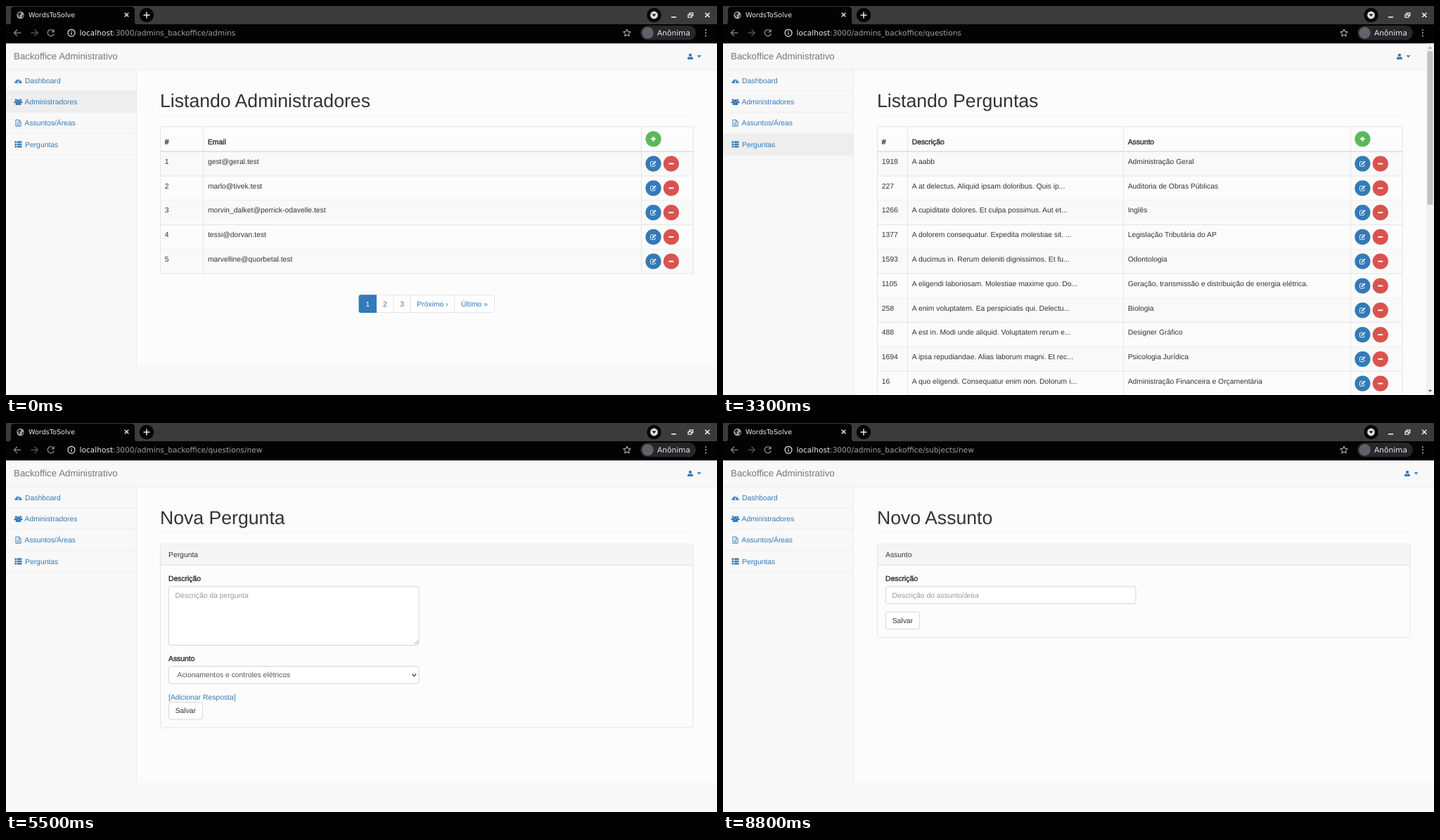
These frames come from a looping animation (1011x554 px, 9.9 s). An HTML page:

```html
<!DOCTYPE html>
<html lang="pt-BR">
<head>
<meta charset="utf-8">
<title>Backoffice</title>
<style>
html, body { margin: 0; width: 100%; height: 100%; overflow: hidden; background: #f8f8f8; }
#strip { width: 1011px; animation: pages 9.9s steps(9) infinite; }
@keyframes pages { to { transform: translateY(-100%); } }
svg { display: block; width: 1011px; height: 554px; }
text { font: 10.36px "Liberation Sans", Arial, sans-serif; fill: #333; text-rendering: geometricPrecision; white-space: pre; }
.h1 { font-size: 26.64px; }
.brand { font-size: 13.32px; fill: #777; }
.bold { stroke: #333; stroke-width: .42px; }
.link { fill: #337ab7; }
.val { fill: #555; }
.hint { fill: #999; }
.on { fill: #fff; }
.mid { text-anchor: middle; }
.ui { font: 10.6px "DejaVu Sans", sans-serif; fill: #e8eaed; }
.ui .path { fill: #9aa0a6; }
.tab { font-size: 9.65px; }
.line { fill: none; stroke: #e8eaed; stroke-width: 1.2; }
</style>
</head>
<body>
<div id="strip"></div>
<script>
const BLUE = '#337ab7', GREEN = '#5cb85c', RED = '#d9534f';
const ROW = 34.78, FIELD = 54.7;

const rect = (x, y, w, h, fill, more = '') =>
  `<rect x="${x}" y="${y}" width="${w}" height="${h}" fill="${fill}" ${more}/>`;
const box = (x, y, w, h, fill, stroke = '#ccc', r = 3) =>
  rect(x, y, w, h, fill, `rx="${r}" stroke="${stroke}" stroke-width=".8"`);
const text = (x, y, s, cls = '') => `<text x="${x}" y="${y}" class="${cls}">${s}</text>`;
const path = (d, stroke, w = 1, more = '') =>
  `<path d="${d}" fill="none" stroke="${stroke}" stroke-width="${w}" ${more}/>`;
const solid = (d, fill) => `<path d="${d}" fill="${fill}"/>`;
const dot = (x, y, r, fill) => `<circle cx="${x}" cy="${y}" r="${r}" fill="${fill}"/>`;
const at = (x, y, s) => `<g transform="translate(${x} ${y})">${s}</g>`;
const hline = (x1, x2, y, c = '#ddd', w = .75) => path(`M${x1} ${y}H${x2}`, c, w);

const person = (x, y, k) => at(x, y, `<g transform="scale(${k})">` + dot(0, -2.1, 2.2, BLUE) +
  solid('M-4 4.2V2.6Q-4 .3-2 .2Q0 1.7 2 .2Q4 .3 4 2.6V4.2Z', BLUE) + '</g>');

const icons = [
  solid('M-5.2 3.8A5.2 5.2 0 1 1 5.2 3.8Z', BLUE) + dot(-3.4, .8, .7, '#f8f8f8') +
    dot(-2.3, -1.8, .7, '#f8f8f8') + dot(0, -2.8, .7, '#f8f8f8') + dot(3.4, .8, .7, '#f8f8f8') +
    path('M0 2.2 1.4-1.4', '#f8f8f8', .9) + dot(0, 2.3, 1.1, '#f8f8f8'),
  person(-3.3, -1, .7) + person(3.3, -1, .7) + person(0, .7, .95),
  path('M-3.6-4.6H1L3.6-2V4.6H-3.6ZM.8-4.6V-1.8H3.6', BLUE, .9) +
    path('M-2 0H2M-2 1.5H2M-2 3H2', BLUE, .7),
  [-3.3, 0, 3.3].map(y => rect(-5, y - 1.2, 2.5, 2.4, BLUE) + rect(-1.8, y - 1.2, 6.8, 2.4, BLUE)).join('')
];

const round = (x, y, fill, icon) => at(x, y, dot(0, 0, 11.1, fill) + icon);
const plus = path('M-3.4 0H3.4M0-3.4V3.4', '#fff', 1.9);
const minus = path('M-3.4 0H3.4', '#fff', 2);
const pencil = path('M2.5 .9V2.6Q2.5 3.7 1.4 3.7H-2.8Q-3.9 3.7-3.9 2.6V-1.8Q-3.9-2.9-2.8-2.9H.6', '#fff', .9) +
  path('M-1.4 1.4 3.5-3.3', '#fff', 1.7);

function browser(url) {
  return rect(0, 0, 1011, 26.5, '#3b3b3b') + rect(0, 26, 1011, 27.3, '#030303') +
    solid('M3 26.5Q7 26.5 7 22.5V6Q7 1 12 1H178Q183 1 183 6V22.5Q183 26.5 187 26.5Z', '#030303') +
    dot(20.5, 13, 5.2, '#a4a8ac') +
    solid('M16.5 11.5Q18 8.5 20.5 9L22 11 19.5 13 20 15.5 18.5 16ZM22.5 13.5 25 12.5Q25 15.5 22.5 17Z', '#222') +
    text(32, 16.3, 'WordsToSolve', 'ui tab') +
    path('M168.7 9.7l5.6 5.6m0-5.6l-5.6 5.6', '#e8eaed', 1.4) +
    dot(200, 13, 10.2, '#030303') + path('M195.5 13h9M200 8.5v9', '#e8eaed', 1.5) +
    dot(921.5, 13, 10.2, '#030303') + dot(921.5, 13, 5.4, '#dcdcdc') +
    solid('M918.6 11.6h5.8l-2.9 3.4Z', '#111') +
    path('M946 15.8h7', '#eee', 1.6) +
    path('M970 12.5h4.8v3.6H970ZM972 12v-2.2h4.8v4H975', '#eee', 1.3) +
    path('M994.2 9.7l6.2 6.2m0-6.2l-6.2 6.2', '#eee', 1.5) +
    path('M21.3 38.3H11.5M16 33.7l-4.6 4.6 4.6 4.6', '#85888c', 1.3) +
    path('M35.3 38.3h9.8M40.6 33.7l4.6 4.6-4.6 4.6', '#55585c', 1.3) +
    path('M67.4 35.2A4.6 4.6 0 1 0 68.3 39.5', '#85888c', 1.4) + solid('M68.7 33v4.6h-4.6Z', '#85888c') +
    '<circle class="line" cx="93" cy="38.3" r="5"/>' + path('M93 37.5v3.4M93 35.2v1.3', '#e8eaed', 1.2) +
    text(104.5, 42, `localhost<tspan class="path">:3000/admins_backoffice/${url}</tspan>`, 'ui') +
    path('M883 33.2l1.5 3.4 3.7.3-2.8 2.5.8 3.6-3.2-1.9-3.2 1.9.8-3.6-2.8-2.5 3.7-.3Z', '#d0d2d5', 1) +
    rect(902, 28, 79, 20.6, '#25272a', 'rx="10.3"') + dot(912.5, 38.3, 8.3, '#5f6368') +
    text(926, 42, 'Anônima', 'ui') +
    [34.2, 38.3, 42.4].map(y => dot(995, y, 1, '#b5b8bc')).join('');
}

const menu = ['Dashboard', 'Administradores', 'Assuntos/Áreas', 'Perguntas'];

function frame(active, right) {
  return rect(0, 53.3, 1011, 501, '#f8f8f8') +
    rect(185.5, 91, right + 34 - 185.5, right < 970 ? 463 : 421, '#fcfcfc') +
    path(`M185.5 91V${right < 970 ? 554 : 512}`, '#e7e7e7', .8) +
    hline(0, right + 34, 90.8, '#e7e7e7') +
    text(11, 76.4, 'Backoffice Administrativo', 'brand') +
    person(right - 4.5, 72, .98) + solid(`M${right + 5} 70.3h6.2l-3.1 3.2Z`, BLUE) +
    menu.map((name, i) => {
      const y = 105.7 + 30.35 * i;
      return (i === active ? rect(0, y - 15, 185, 30.3, '#eeeeee') : '') +
        hline(0, 185, y + 15.2, '#e7e7e7') + at(17.5, y + .3, icons[i]) +
        text(i % 3 ? 26.5 : 27, y + 3.8, name, 'link');
    }).join('');
}

function scrollbar(end) {
  return rect(1000, 53.3, 11, 501, '#f1f1f1') + rect(1001.5, 64.5, 8, end - 64.5, '#c1c1c1') +
    solid('M1002.8 60.8h5.4l-2.7-3Z', '#a3a3a3') + solid('M1002.8 546.8h5.4l-2.7 3Z', '#505050');
}

function page({ url, title, body, active = -1, scroll = 0 }) {
  const right = scroll ? 966.4 : 977.5;
  return '<svg viewBox="0 0 1011 554">' + frame(active, right) + browser(url) +
    text(219, 144.2, title, 'h1') + hline(219, right, 156, '#eee') +
    body(right) + (scroll ? scrollbar(scroll) : '') + '</svg>';
}

// cols: left edge of each text column; the action column is always last
const table = (cols, heads, rows) => right => {
  const top = 171.8, first = 207.3, bottom = first + ROW * rows.length;
  const act = right - 74, edges = [...cols, act, right - .3];
  const cells = (list, y, cls) => list.map((s, i) => text(cols[i] + 6.3, y, s, cls)).join('');
  return rows.map((r, i) => {
    const y = first + ROW * i;
    return (i % 2 ? '' : rect(cols[0], y, right - cols[0], ROW, '#f9f9f9')) +
      hline(cols[0], right, y + ROW) + cells(r, y + 17.6) +
      round(act + 17, y + 17.3, BLUE, pencil) + round(act + 42.4, y + 17.3, RED, minus);
  }).join('') + cells(heads, 196.7, 'bold') + round(act + 17, 189.3, GREEN, plus) +
    hline(cols[0], right, top) + hline(cols[0], right, first, '#ddd', 1.5) +
    edges.map(x => path(`M${x} ${top}V${bottom}`, '#ddd', .75)).join('');
};

function pager() {
  const xs = [502, 527, 551, 575.5, 637.5, 694.5];
  const names = ['1', '2', '3', 'Próximo ›', 'Último »'];
  return box(502, 411.7, 192.5, 24.8, '#fff', '#ddd') +
    solid('M527 411.3V436.9H504.6Q501.6 436.9 501.6 433.9V414.3Q501.6 411.3 504.6 411.3Z', BLUE) +
    xs.slice(2, 5).map(x => path(`M${x} 411.7V436.5`, '#ddd', .75)).join('') +
    names.map((s, i) => text((xs[i] + xs[i + 1]) / 2, 427.7, s, 'mid ' + (i ? 'link' : 'on'))).join('');
}

const button = y => box(231.4, y, 48, 24.5, '#fff') + text(255.4, y + 15.9, 'Salvar', 'mid');
const label = (y, s) => text(231, y, s, 'bold');

function panel(name, bottom, right) {
  const w = right - 219.8;
  return box(219.5, 172, w, bottom - 172, '#fcfcfc', '#ddd') +
    rect(219.9, 172.4, w - .8, 30, '#f5f5f5', 'rx="2.5"') + hline(219.5, right - .3, 202.4) +
    text(231, 190.8, name);
}

// fields: [label, content, filled in]
const form = (name, fields) => right => {
  const end = 269 + FIELD * (fields.length - 1);
  return panel(name, end + 36.2, right) + fields.map(([title, s, filled], i) => {
    const y = 233 + FIELD * i;
    return label(y - 8.2, title) + box(231.4, y, 355.6, 24.5, '#fff') +
      text(240.5, y + 15.6, s, filled ? 'val' : 'hint');
  }).join('') + button(end);
};

function answer(name, i, checked) {
  const y = 401.6 + 37.7 * i;
  return label(y - 7.8, 'Description') + box(231.4, y, 117, 18, '#fff', '#767676', 1) +
    text(234, y + 12.6, name) +
    (checked ? rect(351.5, y + 2.8, 9.6, 9.6, '#0b75e8', 'rx="1.8"') + path(`M353.4 ${y + 7.6}l2.1 2.2 3.8-4.6`, '#fff', 1.4)
      : box(351.9, y + 3.2, 8.8, 8.8, '#fff', '#767676', 1.6)) +
    text(364, y + 12.6, 'Correta?') + text(407, y + 12.6, 'Remover', 'link');
}

const question = (desc, subject, answers, filled) => right => {
  const w = (right < 970 ? 581.4 : 587) - 231.4, x = 231.4 + w, end = 397.5 + 37.7 * answers.length;
  return panel('Pergunta', end + 36.4, right) +
    label(224.8, 'Descrição') + box(231.4, 233, w, 83.5, '#fff') +
    text(240.5, 248.6, desc, filled ? 'val' : 'hint') +
    path(`M${x - 6} 315l5-5M${x - 3} 315l2-2`, '#777', .7) +
    label(338.8, 'Assunto') + box(231.4, 346.6, w, 24.5, '#fff') + text(243.5, 362.4, subject, 'val') +
    path(`M${x - 9.4} 357.6l2.8 2.8 2.8-2.8`, '#444', 1.4) +
    answers.map((s, i) => answer(s, i, i === 1)).join('') +
    text(231, end - 3.8, '[Adicionar Resposta]', 'link') + button(end);
};

const admins = ['gest@geral.test', 'marlo@tivek.test', 'morvin_dalket@perrick-odavelle.test',
  'tessi@dorvan.test', 'marvelline@quorbetal.test'];

const questions = [
  ['1918', 'A aabb', 'Administração Geral'],
  ['227', 'A at delectus. Aliquid ipsam doloribus. Quis ip...', 'Auditoria de Obras Públicas'],
  ['1266', 'A cupiditate dolores. Et culpa possimus. Aut et...', 'Inglês'],
  ['1377', 'A dolorem consequatur. Expedita molestiae sit. ...', 'Legislação Tributária do AP'],
  ['1593', 'A ducimus in. Rerum deleniti dignissimos. Et fu...', 'Odontologia'],
  ['1105', 'A eligendi laboriosam. Molestiae maxime quo. Do...', 'Geração, transmissão e distribuição de energia elétrica.'],
  ['258', 'A enim voluptatem. Ea perspiciatis qui. Delectu...', 'Biologia'],
  ['488', 'A est in. Modi unde aliquid. Voluptatem rerum e...', 'Designer Gráfico'],
  ['1694', 'A ipsa repudiandae. Alias laborum magni. Et rec...', 'Psicologia Jurídica'],
  ['16', 'A quo eligendi. Consequatur enim non. Dolorum i...', 'Administração Financeira e Orçamentária']
];

const subjects = [
  ['1', 'Acionamentos e controles elétricos'], ['3', 'Administração Financeira e Orçamentária'],
  ['4', 'Administração Geral'], ['5', 'Administração Pública'], ['2', 'Administração de Recursos Materiais'],
  ['6', 'Agronomia'], ['8', 'Algoritmos e Estrutura de Dados'], ['11', 'Anatomia Aplicada à Odontologia'],
  ['12', 'Anatomia Dental'], ['13', 'Anatomia Humana']
];

const adminForm = email => form('Administrador', [
  ['Email', email || 'Email do administrador', email],
  ['Senha', 'Digite uma senha'],
  ['Confirmação da Senha', 'Confirme a senha']
]);
const subjectForm = s => form('Assunto', [['Descrição', s || 'Descrição do assunto/área', s]]);
const adminTable = table([219.5, 280.6], ['#', 'Email'], admins.map((mail, i) => [i + 1, mail]));

const pages = [
  { url: 'admins', title: 'Listando Administradores', active: 1, body: right => adminTable(right) + pager() },
  { url: 'admins/1/edit', title: 'Editando Administrador', body: adminForm(admins[0]) },
  { url: 'admins/new', title: 'Novo Administrador', body: adminForm() },
  { url: 'questions', title: 'Listando Perguntas', active: 3, scroll: 283,
    body: table([219.5, 262.4, 569.4], ['#', 'Descrição', 'Assunto'], questions) },
  { url: 'questions/1918/edit', title: 'Editando Pergunta', scroll: 538,
    body: question('A aabb', 'Administração Geral', ['resp1', 'resp2', 'resp3'], true) },
  { url: 'questions/new', title: 'Nova Pergunta',
    body: question('Descrição da pergunta', subjects[0][1], []) },
  { url: 'subjects', title: 'Listando Assuntos', active: 2, scroll: 283,
    body: table([219.5, 291.1], ['#', 'Descrição'], subjects) },
  { url: 'subjects/1/edit', title: 'Editando Assunto', body: subjectForm(subjects[0][1]) },
  { url: 'subjects/new', title: 'Novo Assunto', body: subjectForm() }
];

document.getElementById('strip').innerHTML = pages.map(page).join('');
</script>
</body>
</html>
```
